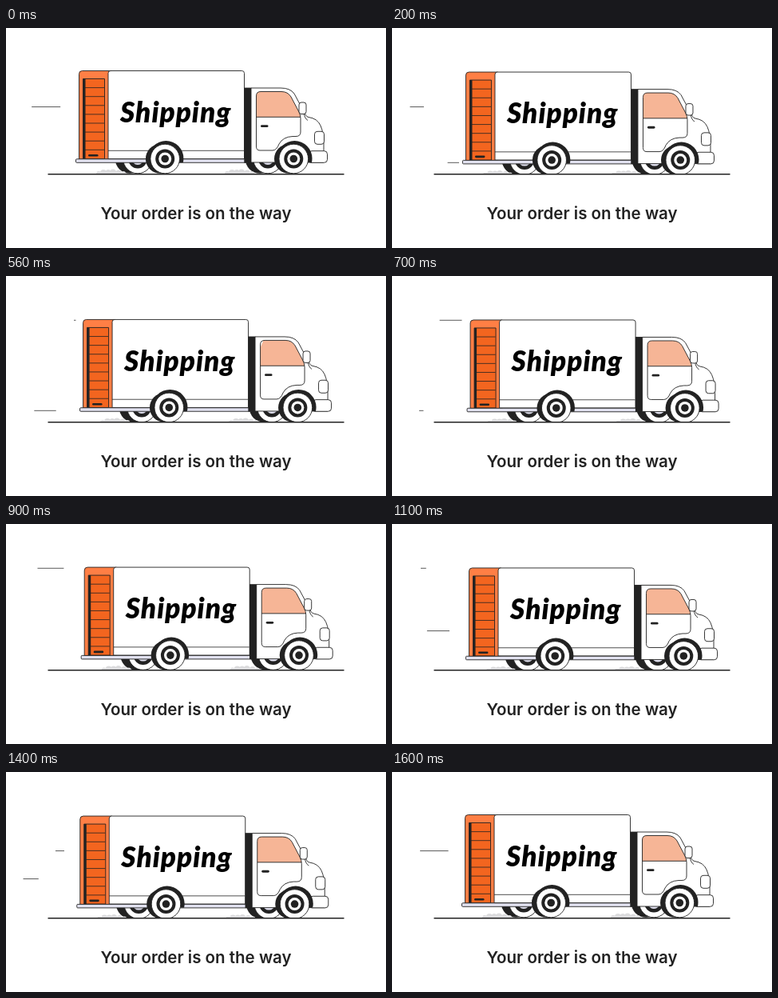
These frames come from a looping animation (476 px wide and 275 px high, 1.63 s). An HTML page with a canvas:

```html
<!DOCTYPE html>
<html lang="en">
<head>
<meta charset="utf-8">
<title>Your order is on the way</title>
<style>
  html, body { margin: 0; width: 100%; height: 100%; overflow: hidden; background: #fff; }
  canvas { display: block; width: 476px; height: 275px; }
</style>
</head>
<body>
<canvas id="stage"></canvas>
<script>
const W = 476, H = 275, LOOP = 1630, FPS = 30, BOB = 400;
const INK = '#222222', WHITE = '#fff', ORANGE = '#ff7f45', DOOR = '#f3651f',
      PEACH = '#f6b596', LAVENDER = '#e2e2f0', DUST = '#dcdcde';

const canvas = document.getElementById('stage');
const ctx = canvas.getContext('2d');
const ratio = window.devicePixelRatio || 1;
canvas.width = W * ratio;
canvas.height = H * ratio;

const clamp = u => Math.min(1, Math.max(0, u));
const easeOut = u => Math.sin(clamp(u) * Math.PI / 2);
const easeInOut = u => (1 - Math.cos(clamp(u) * Math.PI)) / 2;

// The body sinks slowly and springs back faster.
function bob(t) {
  const phase = t % BOB / BOB, turn = 0.65;
  return 1.8 * easeInOut(phase < turn ? phase / turn : (1 - phase) / (1 - turn));
}
const sway = t => 6.9 * easeInOut(1 - Math.abs(1 - 2 * t / LOOP));

function paint(path, fill, stroke = INK, width = 0.9) {
  if (fill) { ctx.fillStyle = fill; ctx.fill(path); }
  if (stroke) { ctx.strokeStyle = stroke; ctx.lineWidth = width; ctx.stroke(path); }
}
function box(x, y, w, h, radii, fill, stroke, width) {
  const path = new Path2D();
  path.roundRect(x, y, w, h, radii);
  paint(path, fill, stroke, width);
}
function disc(x, y, r, fill, stroke = null, width) {
  const path = new Path2D();
  path.arc(x, y, r, 0, Math.PI * 2);
  paint(path, fill, stroke, width);
}
function line(x1, y1, x2, y2, width) {
  paint(new Path2D(`M${x1} ${y1}L${x2} ${y2}`), null, INK, width);
}
function clipped(path, draw) {
  ctx.save();
  ctx.clip(path);
  draw();
  ctx.restore();
}
function area(x, y, w, h) {
  const path = new Path2D();
  path.rect(x, y, w, h);
  return path;
}

// Each streak grows leftward, then its tail catches up.
const streaks = [
  { y: 98.6, left: 22.5, right: 73, start: 1330 },
  { y: 168.3, left: 34, right: 84, start: 107 },
  { y: 55.3, left: 36, right: 87.5, start: 518 },
  { y: 133.6, left: 21.5, right: 72, start: 912 }
];
function drawStreaks(t) {
  for (const { y, left, right, start } of streaks) {
    const age = (t - start + LOOP) % LOOP;
    const span = right - left;
    const head = right - span * easeOut(age / 500);
    const tail = right - span * easeInOut((age - 200) / 500);
    if (tail - head > 0.2) line(head, y, tail, y, 0.75);
  }
}

function farWheel(x) {
  clipped(area(x - 30, 166, 60, 20), () => {
    disc(x - 2, 163.5, 18.3, INK);
    disc(x + 8, 163.5, 18.3, WHITE, INK);
    disc(x + 8, 163.5, 12, INK);
    disc(x + 8, 163.5, 7.5, LAVENDER);
  });
}
function dust(x) {
  clipped(area(x - 6, 170, 48, 12.5), () => {
    for (const [dx, y, r] of [[3, 182, 3], [9, 181, 4], [15, 180.5, 3.5], [21, 181, 4.5], [28, 181, 3.5], [34, 182, 3]])
      disc(x + dx, y, r, DUST);
  });
}
function nearWheel(x) {
  clipped(area(x - 26, 138, 52, 30), () => disc(x + 1.2, 163, 22, INK));
  disc(x - 6, 163.5, 18.3, INK);
  disc(x, 163.5, 18.3, WHITE, INK);
  disc(x, 163.5, 12, INK);
  disc(x, 163.5, 8, WHITE);
  disc(x, 163.5, 4.8, INK);
}

function drawCargo() {
  box(91.5, 53.5, 40, 110.5, [4, 0, 0, 0], ORANGE);
  box(96.5, 63.5, 27, 100, 0, DOOR);
  ctx.fillStyle = INK;
  ctx.fillRect(96.5, 63.5, 3, 100);
  for (let i = 1; i < 9; i++) line(99, 63.5 + i * 11.1, 123, 63.5 + i * 11.1, 0.8);
  box(103, 158, 12.5, 2.6, 1.3, INK, null);
  box(128, 53.5, 170.5, 110, [3, 3, 0, 0], WHITE);
  line(128, 153.3, 298, 153.3, 0.8);
  box(87.5, 163.8, 216, 4.5, 1, LAVENDER);

  ctx.fillStyle = '#000';
  ctx.font = 'italic 900 35px Lato, sans-serif';
  ctx.letterSpacing = '1px';
  ctx.textAlign = 'center';
  ctx.fillText('Shipping', 212.7, 117.7);
  ctx.letterSpacing = '0px';
}

const cab = new Path2D(`M307 75H344Q356 75 361 82L375.5 109Q376.5 111 379 111.5
  Q390 113 394 122Q398 131 398 145V168H307Z`);
const door = new Path2D(`M313.5 85Q313.5 79.5 319 79.5H345Q353 79.5 357 86L367 105
  Q369 109 369 113V130Q369 135.5 363 135.5H359Q347 136 342 145Q339 153 334 153
  H318Q313.5 153 313.5 148Z`);

function drawGlint(t) {
  const x = 332 - (t - 400) * 0.24;
  ctx.fillStyle = WHITE;
  for (const [dx, w] of [[0, 10], [13.5, 4]])
    ctx.fill(new Path2D(`M${x + dx} 79h${w}l-14 34h${-w}Z`));
}

function drawCab(t) {
  ctx.fillStyle = INK;
  ctx.fillRect(298.3, 74.6, 9, 93.9);
  paint(cab, WHITE);
  clipped(door, () => {
    ctx.fillStyle = PEACH;
    ctx.fillRect(313, 79, 57, 32.3);
    if (t > 200 && t < 600) clipped(area(313, 79, 57, 32.3), () => drawGlint(t));
    line(313, 111.3, 370, 111.3);
  });
  paint(door, null);
  box(319, 121.3, 9.5, 2.8, 1.4, INK, null);
  paint(new Path2D('M373 106Q374 113 378 115.5'), null);
  box(367, 93, 9, 14.5, 3, WHITE);
  box(386.5, 129.3, 12, 16, 3.5, WHITE);
  box(380, 153.7, 22.5, 14.6, [3, 4, 4, 2], WHITE);
}

function drawTruck(t) {
  ctx.save();
  ctx.clip(area(0, 0, W, 183));
  ctx.translate(sway(t), bob(t));
  farWheel(157);
  farWheel(320);
  dust(113);
  dust(274);
  drawCargo();
  drawCab(t);
  nearWheel(199.2);
  nearWheel(360.3);
  ctx.restore();
}

function render(now) {
  const frame = Math.floor((now % LOOP + 3.4) * FPS / 1000);
  const t = frame * 1000 / FPS % LOOP;
  ctx.setTransform(ratio, 0, 0, ratio, 0, 0);
  ctx.fillStyle = WHITE;
  ctx.fillRect(0, 0, W, H);
  ctx.lineJoin = 'round';
  drawStreaks(t);
  drawTruck(t);
  line(52.5, 182.75, 423.5, 182.75, 1.5);
  ctx.fillStyle = INK;
  ctx.font = '600 20.5px Inter, sans-serif';
  ctx.textAlign = 'center';
  ctx.fillText('Your order is on the way', 238, 238.7);
}

const began = performance.now();
function tick() {
  render(performance.now() - began);
  requestAnimationFrame(tick);
}
tick();
</script>
</body>
</html>
```
